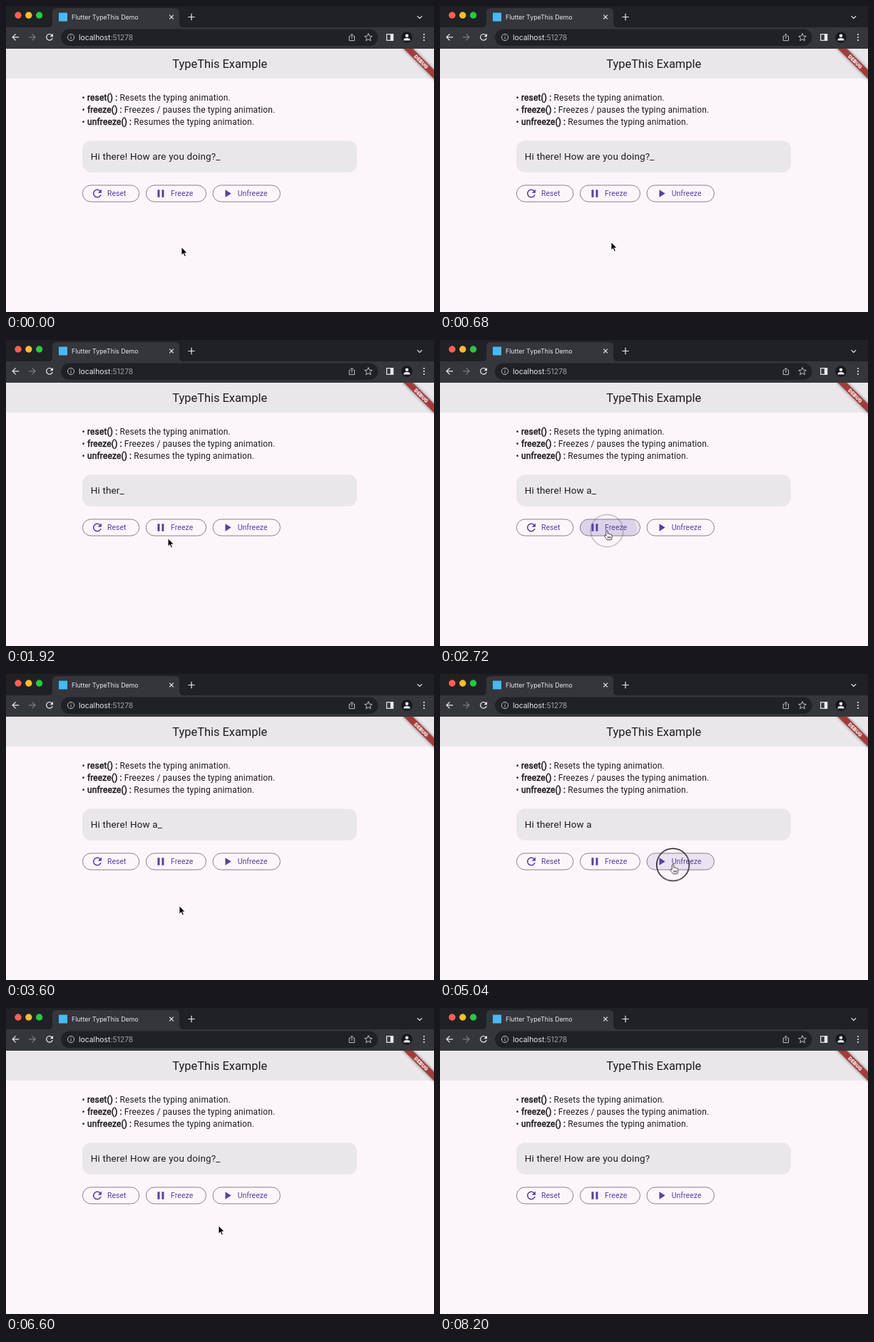
Recreate the animation shown at these times as an HTML page. Size 600 by 430 pixels, loop 8240 ms.

```html
<!DOCTYPE html>
<html lang="en">
<head>
<meta charset="utf-8">
<title>TypeThis Demo</title>
<style>
  html, body { margin: 0; width: 100%; height: 100%; overflow: hidden; background: #fcf6fb; }
  svg { display: block; width: 600px; height: 430px; }
  text { white-space: pre; }

  .ui { font-family: Inter, "Open Sans", sans-serif; fill: #e8eaed; }
  .page { font-family: Roboto, Arial, sans-serif; fill: #1d1b20; }
  .title { font-size: 16.4px; text-anchor: middle; }
  .list { font-size: 11.92px; letter-spacing: .186px; }
  .strong { stroke: #1d1b20; stroke-width: .5px; }
  .typed { font-size: 13.41px; letter-spacing: .186px; }
  .line { fill: none; stroke: #e8eaed; stroke-width: 1.2px; }

  .button { fill: #5641a0; }
  .button text { font: 500 10.43px Roboto, Arial, sans-serif; font-weight: 400; letter-spacing: .075px; }
  .outline { fill: none; stroke: #79747e; stroke-width: .9px; }

  /* One loop shared by every part of the pointer story */
  .move, .arrow, .hand, .hover, .ink, .ring { animation: 8240ms linear infinite; }
  .move { animation-name: move; animation-timing-function: ease-in-out; }
  .arrow { animation-name: arrow; animation-timing-function: step-end; }
  .hand { animation-name: hand; animation-timing-function: step-end; }
  .ink, .ring { transform-box: fill-box; transform-origin: center; animation-delay: calc(var(--press) - 8240ms); }
  .ink { animation-name: ink; fill-opacity: .13; }
  .ring { animation-name: ring; fill: none; stroke: #141318; stroke-width: 1.4px; }
  .hover { fill-opacity: .1; }
  .reset .hover { animation-name: hover-reset; }
  .freeze .hover { animation-name: hover-freeze; }
  .unfreeze .hover { animation-name: hover-unfreeze; }
  .reset { --press: 1050ms; }
  .freeze { --press: 2600ms; }
  .unfreeze { --press: 5000ms; }

  @keyframes move {
    0%, 7.28% { transform: translate(246px, 339px); }
    9.71%, 11.17% { transform: translate(228px, 318px); }
    12.62%, 16.99% { transform: translate(150px, 268px); }
    19.9% { transform: translate(185px, 292px); animation-timing-function: linear; }
    21.36% { transform: translate(205px, 296px); animation-timing-function: linear; }
    23.3% { transform: translate(227px, 279px); animation-timing-function: ease-out; }
    25.24%, 33.01% { transform: translate(234px, 268px); }
    37.86%, 45.63% { transform: translate(243px, 326px); }
    51.46%, 64.56% { transform: translate(326.5px, 268px); }
    69.42%, 100% { transform: translate(298px, 306px); }
  }
  @keyframes arrow {
    0%, 17.7%, 34.5%, 65.5% { opacity: 1; }
    12.4%, 24%, 50.2%, 87.4%, 100% { opacity: 0; }
  }
  @keyframes hand {
    0%, 17.7%, 34.5%, 65.5%, 100% { opacity: 0; }
    12.4%, 24%, 50.2% { opacity: 1; }
  }
  @keyframes hover-reset {
    0%, 12.4%, 18.3%, 100% { opacity: 0; }
    13%, 17.7% { opacity: 1; }
  }
  @keyframes hover-freeze {
    0%, 24%, 35.1%, 100% { opacity: 0; }
    24.6%, 34.5% { opacity: 1; }
  }
  @keyframes hover-unfreeze {
    0%, 50.2%, 66.1%, 100% { opacity: 0; }
    50.8%, 65.5% { opacity: 1; }
  }
  @keyframes ink {
    0% { opacity: 0; transform: scale(.2); }
    .5% { opacity: .05; transform: scale(.35); }
    1.9%, 3.6% { opacity: 1; transform: none; }
    6.5%, 100% { opacity: 0; transform: none; }
  }
  @keyframes ring {
    0% { opacity: 1; transform: scale(1.08); }
    .4%, 1.1% { opacity: 1; transform: none; }
    1.6%, 100% { opacity: 0; transform: none; }
  }
</style>
</head>
<body>
<svg viewBox="0 0 600 430">
  <defs>
    <path id="refresh" d="M17.65 6.35C16.2 4.9 14.21 4 12 4c-4.42 0-7.99 3.58-7.99 8s3.57 8 7.99 8c3.73 0 6.84-2.55 7.73-6h-2.08c-.82 2.33-3.04 4-5.65 4-3.31 0-6-2.69-6-6s2.69-6 6-6c1.66 0 3.14.69 4.22 1.78L13 11h7V4z"/>
    <path id="back" d="M20 11H7.83l5.59-5.59L12 4l-8 8 8 8 1.41-1.41L7.83 13H20z"/>
    <rect id="pill-reset" x="107.4" y="251.9" width="79.4" height="23.2" rx="11.6"/>
    <rect id="pill-freeze" x="196.4" y="251.9" width="84.1" height="23.2" rx="11.6"/>
    <rect id="pill-unfreeze" x="290" y="251.9" width="94.4" height="23.2" rx="11.6"/>
    <clipPath id="clip-reset"><use href="#pill-reset"/></clipPath>
    <clipPath id="clip-freeze"><use href="#pill-freeze"/></clipPath>
    <clipPath id="clip-unfreeze"><use href="#pill-unfreeze"/></clipPath>
    <clipPath id="clip-page"><rect y="60" width="600" height="370"/></clipPath>
    <filter id="blur" x="-20%" y="-80%" width="140%" height="260%"><feGaussianBlur stdDeviation="2.6"/></filter>
  </defs>

  <!-- Browser -->
  <rect width="600" height="60" fill="#202124"/>
  <path d="M59 30q6 0 6-6V9q0-6 6-6H237q6 0 6 6V24q0 6 6 6H600V60H0V30z" fill="#35363a"/>
  <circle cx="17" cy="13" r="4.7" fill="#ff5f57"/>
  <circle cx="31.8" cy="13" r="4.7" fill="#febc2e"/>
  <circle cx="46.6" cy="13" r="4.7" fill="#28c840"/>
  <rect x="74" y="9.5" width="12" height="12" fill="#47b9f5"/>
  <text class="ui" x="92" y="18.8" font-size="8.8">Flutter TypeThis Demo</text>
  <path class="line" d="M229.2 12.7l5.6 5.6m0-5.6l-5.6 5.6"/>
  <path class="line" stroke-width="1.5" d="M255.3 15.5h9.4M260 10.8v9.4"/>
  <path class="line" d="M576.6 14.2l3.3 3.3 3.3-3.3"/>

  <rect x="77" y="32.5" width="444.5" height="23.5" rx="11.75" fill="#202124"/>
  <g fill="#e8eaed">
    <use href="#back" transform="translate(5.8 36.4) scale(.62)"/>
    <use href="#back" transform="translate(44.4 36.4) scale(-.62 .62)" fill="#7b7c80"/>
    <use href="#refresh" transform="translate(53.6 36.4) scale(.62)"/>
  </g>
  <g class="line" stroke-width="1" style="stroke: #bdc1c6; stroke-width: 1px">
    <circle cx="91" cy="44" r="4.6"/>
    <path d="M91 43.4v3.2M91 41.2v1.1"/>
    <path d="M483 42.3h-1.8v6.3h7.4v-6.3h-1.8M484.9 46v-6.6m-2 1.9l2-2 2 2"/>
    <path d="M508 38.6l1.5 3.6 3.8.3-2.9 2.5.9 3.8-3.3-2.1-3.3 2.1.9-3.8-2.9-2.5 3.8-.3z"/>
  </g>
  <text class="ui" x="102" y="47.8" font-size="10.4">localhost<tspan fill="#9aa0a6">:51278</tspan></text>
  <rect class="line" x="533.7" y="39.7" width="9" height="8.6"/>
  <rect x="538.8" y="39.5" width="4.2" height="9" fill="#e8eaed"/>
  <circle cx="562" cy="44" r="7.8" fill="#17181b"/>
  <g fill="#e8eaed">
    <circle cx="562" cy="41.7" r="2.3"/>
    <path d="M557.4 48.4q0-3.3 4.6-3.3t4.6 3.3z"/>
    <circle cx="586" cy="40" r="1.1"/>
    <circle cx="586" cy="44" r="1.1"/>
    <circle cx="586" cy="48" r="1.1"/>
  </g>

  <!-- Page -->
  <rect y="60" width="600" height="370" fill="#fcf6fb"/>
  <rect y="60" width="600" height="42" fill="#e9e7ea"/>
  <g class="page">
    <text class="title" x="299.7" y="86.6">TypeThis Example</text>
    <g class="list">
      <text x="106.6" y="132.6">• <tspan class="strong">reset() : </tspan>Resets the typing animation.</text>
      <text x="106.6" y="149.7">• <tspan class="strong">freeze() : </tspan>Freezes / pauses the typing animation.</text>
      <text x="106.6" y="166.8">• <tspan class="strong">unfreeze() : </tspan>Resumes the typing animation.</text>
    </g>
    <rect x="107" y="189.3" width="385" height="44.4" rx="12" fill="#e9e7ea"/>
    <text class="typed" x="118.7" y="215.9" id="typed"></text>
  </g>

  <g class="button reset">
    <use class="hover" href="#pill-reset"/>
    <g clip-path="url(#clip-reset)"><circle class="ink" cx="150" cy="268" r="48"/></g>
    <use class="outline" href="#pill-reset"/>
    <use href="#refresh" transform="translate(119 254.6) scale(.745)"/>
    <text x="141.9" y="267.4">Reset</text>
    <circle class="ring" cx="150" cy="268" r="22.8"/>
  </g>
  <g class="button freeze">
    <use class="hover" href="#pill-freeze"/>
    <g clip-path="url(#clip-freeze)"><circle class="ink" cx="234" cy="268" r="52"/></g>
    <use class="outline" href="#pill-freeze"/>
    <path d="M6 19h4V5H6zm8-14v14h4V5z" transform="translate(208 254.6) scale(.745)"/>
    <text x="231.1" y="267.4">Freeze</text>
    <circle class="ring" cx="234" cy="268" r="22.8"/>
  </g>
  <g class="button unfreeze">
    <use class="hover" href="#pill-unfreeze"/>
    <g clip-path="url(#clip-unfreeze)"><circle class="ink" cx="326.5" cy="268" r="62"/></g>
    <use class="outline" href="#pill-unfreeze"/>
    <path d="M8 5v14l11-7z" transform="translate(301.5 254.6) scale(.745)"/>
    <text x="324.7" y="267.4">Unfreeze</text>
    <circle class="ring" cx="326.5" cy="268" r="22.8"/>
  </g>

  <g clip-path="url(#clip-page)">
    <g transform="translate(600 60.2) rotate(45) scale(.745)">
      <rect x="-44" y="28" width="88" height="12" fill="#000" opacity=".5" filter="url(#blur)"/>
      <rect x="-44" y="28" width="88" height="12" fill="#a23b3c"/>
      <text class="page" y="37.6" font-size="10.2" font-weight="900" text-anchor="middle" style="fill: #fff">DEBUG</text>
    </g>
  </g>

  <!-- Pointer -->
  <g class="move">
    <path class="arrow" d="M0 0V11.2L2.6 8.8 4.4 13 6.3 12.2 4.5 8.1H8z" fill="#000" stroke="#fff" stroke-width=".8"/>
    <path class="hand" d="M-1.2 .9Q-1.2-.4 0-.4T1.2 .9V4.2Q2.2 3.4 3.2 4.6 4.4 3.9 5.2 5.2 7.2 4.9 7.2 7V9.2Q7 11 6 12.8H.2Q-1.6 10.4-3.2 8.2-4 6.8-2.9 6.3-2.1 6.1-1.2 7.2zM1.4 8v2.8M3.1 8v2.8M4.8 8v2.8" fill="#fff" stroke="#111" stroke-width=".8" stroke-linejoin="round"/>
  </g>
</svg>
<script>
  const LOOP = 8240, STEP = 100, BLINK = 500;
  const RESET = 1130, RESUME = 5060, HELD = 15;
  const message = "Hi there! How are you doing?";
  const typed = document.getElementById("typed");
  let start;

  function typedCount(t) {
    if (t < RESET) return message.length;
    if (t < RESUME) return Math.min(HELD, Math.floor((t - RESET) / STEP));
    return HELD + Math.floor((t - RESUME) / STEP);
  }

  function draw(now) {
    start ??= now;
    const t = (now - start) % LOOP;
    const caretOn = Math.floor((t + 480) / BLINK) % 2 === 0;
    typed.textContent = message.slice(0, typedCount(t)) + (caretOn ? "_" : "");
    requestAnimationFrame(draw);
  }
  requestAnimationFrame(draw);
</script>
</body>
</html>
```
